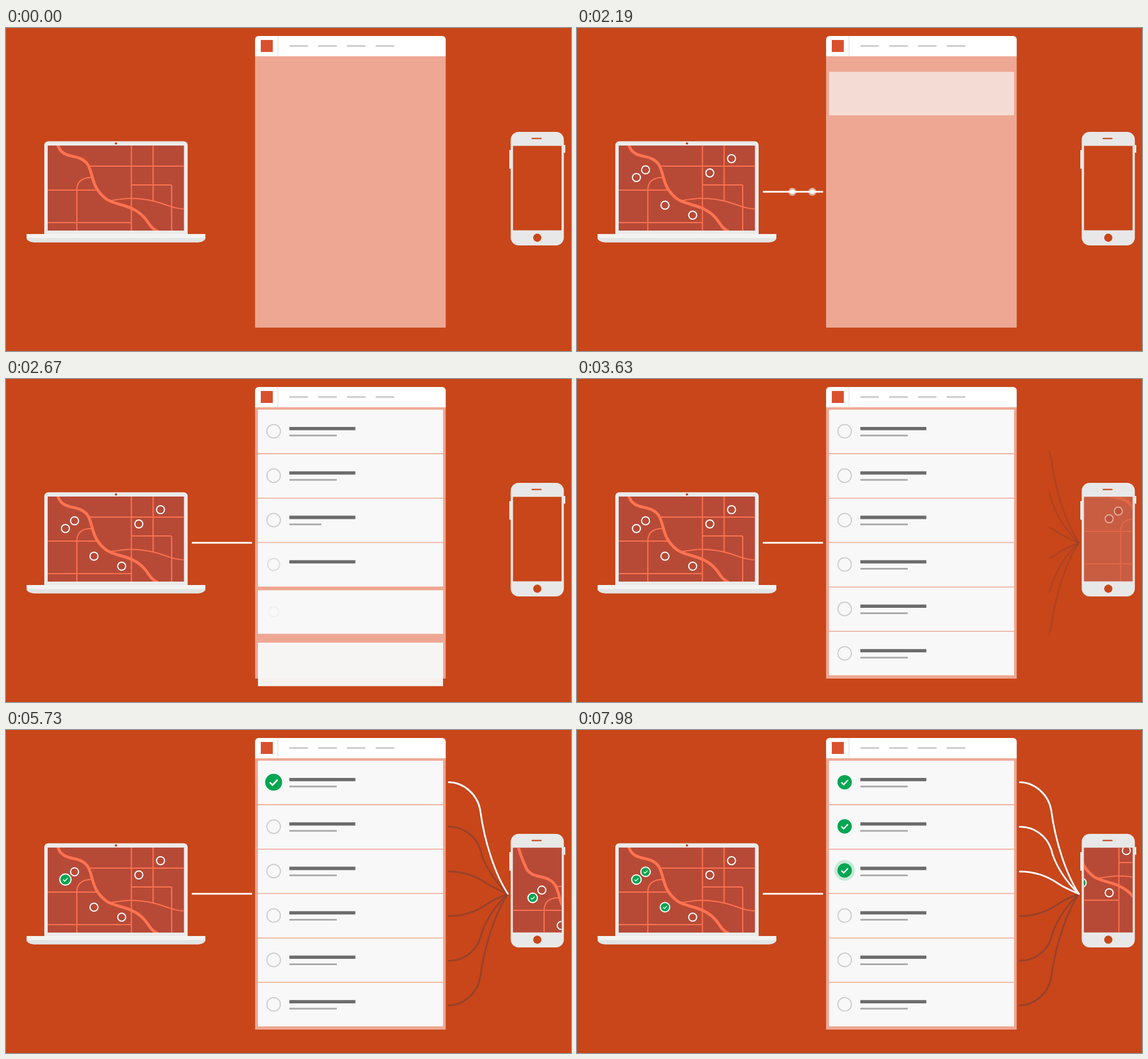
These frames come from a looping animation (989 by 566 pixels, 8 s). An HTML page with a canvas:

```html
<!DOCTYPE html>
<html lang="en">
<head>
<meta charset="utf-8">
<title>Field task flow</title>
<style>
  html, body { margin: 0; width: 100%; height: 100%; overflow: hidden; background: #c8461a; }
  canvas { display: block; }
</style>
</head>
<body>
<canvas id="stage" width="989" height="566"></canvas>
<script>
const ctx = document.getElementById('stage').getContext('2d');
const LOOP = 8000;
const BG = '#c8461a', MAP = '#b74a37', ROAD = '#ff7350', GREEN = '#00a651', WHITE = '#fff';

const markers = [[104, 262], [120, 248.5], [154, 310.5], [202.5, 328], [232.5, 254], [270.5, 229]];
const taskStarts = [5130, 6210, 7260];
const panStarts = [4530, 5595, 6680, 7730];
const panStops = [[827.5, -17], [826, 25], [810, 39], [776, -23], [728.5, -43]];

const river = new Path2D('M78 170C82 186 86 195 91 206C100 232 128 218 143 239C154 257 148 279 176 300C192 311 222 309 242 332C250 341 254 352 265 356');
const roads = new Path2D('M146 242H340M40 284H159M40 341H219.5M219.5 150V420M257.5 150V303' +
  'M219.5 275H288Q290 275 290 277V400M124 420V284Q124 262 150 262M180 303C205 299 222 295 257 303C280 308 292 317 313 317');

// Links for the upper three rows; the lower three mirror them about y = 287.
const upperLinks = [
  'M775 91.5C800 91.5 825 112 830 140C838 200 858 256 878.5 287',
  'M775 169.5C800 169.5 822 185 830 209C836 235 855 265 878.5 287',
  'M775 248C800 248 822 255 842 269C852 276 864 281 878.5 287'
].map(d => new Path2D(d));
const links = [...upperLinks, ...upperLinks.slice().reverse().map(path => {
  const mirrored = new Path2D();
  mirrored.addPath(path, new DOMMatrix([1, 0, 0, -1, 0, 574]));
  return mirrored;
})];

const progress = (t, start, duration) => Math.min(1, Math.max(0, (t - start) / duration));
const ease = p => (1 - Math.cos(Math.PI * p)) / 2;
const mix = (a, b, p) => a + (b - a) * p;
const pop = t => t < 120 ? 1.18 * progress(t, 0, 120) : mix(1.18, 1, progress(t, 120, 100));

function rect(x, y, w, h, color, radius = 0) {
  ctx.fillStyle = color;
  ctx.beginPath();
  ctx.roundRect(x, y, w, h, radius);
  ctx.fill();
}

function circle(x, y, r, fill, stroke, width = 2) {
  ctx.beginPath();
  ctx.arc(x, y, r, 0, Math.PI * 2);
  if (fill) { ctx.fillStyle = fill; ctx.fill(); }
  if (stroke) { ctx.strokeStyle = stroke; ctx.lineWidth = width; ctx.stroke(); }
}

function line(path, color, width) {
  ctx.strokeStyle = color;
  ctx.lineWidth = width;
  ctx.stroke(path);
}

function withAlpha(alpha, draw) {
  ctx.save();
  ctx.globalAlpha *= alpha;
  draw();
  ctx.restore();
}

function clipped(x, y, w, h, draw) {
  ctx.save();
  ctx.beginPath();
  ctx.rect(x, y, w, h);
  ctx.clip();
  draw();
  ctx.restore();
}

function tick(x, y, scale) {
  ctx.save();
  ctx.translate(x, y);
  ctx.scale(scale, scale);
  ctx.lineCap = 'butt';
  line(new Path2D('M-5.7 .2L-1.7 4.2L5.8 -3.6'), WHITE, 2.4);
  ctx.restore();
}

function drawRoads() {
  line(roads, ROAD, 2);
  line(river, ROAD, 5);
}

function drawDoneMarker([x, y], scale) {
  if (scale <= 0) return;
  circle(x, y, 8.3 * scale, GREEN, WHITE, 2);
  tick(x, y, 0.58 * scale);
}

function drawLaptop(t) {
  rect(67, 198.5, 251, 164, '#ebebeb', [7, 7, 0, 0]);
  circle(192.5, 202.3, 2, '#b8401f');
  clipped(73, 206, 238.5, 149, () => {
    rect(73, 206, 239, 149, MAP);
    drawRoads();
    markers.forEach(([x, y], i) => {
      const start = 240 + 110 * i;
      const scale = pop(t - start);
      const ripple = progress(t, start + 100, 400);
      if (scale > 0) circle(x, y, 7 * scale, MAP, WHITE);
      if (ripple > 0 && ripple < 1) withAlpha(0.6 * (1 - ripple), () => circle(x, y, mix(7, 15, ease(ripple)), null, WHITE));
    });
    taskStarts.forEach((start, i) => drawDoneMarker(markers[i], pop(t - start - 480)));
  });
  ctx.fillStyle = '#f3f3f2';
  ctx.fill(new Path2D('M36 361H349V368C349 372 342 375.5 336 375.5H50C43 375.5 36 372 36 368Z'));
  ctx.fillStyle = '#e2e5e4';
  ctx.fill(new Path2D('M36 368H349C349 372 342 375.5 336 375.5H50C43 375.5 36 372 36 368Z'));
}

function drawUplink(t) {
  const grown = ease(progress(t, 1200, 580));
  if (grown > 0) line(new Path2D(`M326.5 287H${mix(326.5, 429.5, grown)}`), WHITE, 3);
  for (let i = 0; i < 3; i++) {
    const p = progress(t, 1877 + 90 * i, 273);
    if (p <= 0 || p >= 1) continue;
    const x = mix(325, 431, p), size = Math.min(1, p * 6, (1 - p) * 8);
    withAlpha(0.55, () => circle(x, 287, 7 * size, WHITE));
    circle(x, 287, 4 * size, WHITE);
  }
}

function drawRow(t, i) {
  const age = t - 2125 - 90 * i;
  if (age <= 0) return;
  const restTop = 53.8 + 77.85 * i;
  const top = restTop + 27 * (1 - ease(progress(age, 0, 260)));
  const done = i < 3 ? t - taskStarts[i] - 480 : -1;
  const checkScale = pop(done);

  withAlpha(progress(age, 0, 100), () => rect(441, top, 324, 76.3, '#f8f8f8'));
  const ring = progress(age, 150, 200);
  if (checkScale < 1) withAlpha(ring, () => circle(468.5, top + 37.7, mix(8.2, 11.8, ring), null, '#ccc'));
  rect(496, top + 30.1, 115.5 * progress(age, 190, 80), 5.8, '#6c6c6c');
  rect(496, top + 43.7, 83 * progress(age, 300, 98), 3, '#aaa');

  if (checkScale > 0) {
    const y = 91.5 + 77.3 * i;
    const halo = progress(done, 140, 125);
    if (halo > 0) withAlpha(1 - halo, () => circle(468.5, y, mix(14, 19, halo), GREEN));
    circle(468.5, y, 12.6 * checkScale, GREEN);
    tick(468.5, y, checkScale);
  }
}

function drawPanel(t) {
  rect(436, 49, 333.7, 476, '#eea792');
  rect(436, 14, 333.7, 35.4, WHITE, [6, 6, 0, 0]);
  rect(446, 21, 21, 21, '#d9502e');
  rect(475.5, 14, 1.2, 35.4, '#ddd');
  for (let i = 0; i < 4; i++) rect(496 + 50.4 * i, 30, 32.5, 3, '#ccc');
  for (let i = 0; i < 6; i++) drawRow(t, i);
}

function drawLinks(t) {
  const wipe = (p, draw) => {
    if (p > 0) clipped(mix(882, 770, p), 80, 115, 415, draw);
  };
  const shown = progress(t, 3270, 720);
  wipe(shown, () => withAlpha(shown, () => links.forEach(path => line(path, '#97412b', 3))));
  taskStarts.forEach((start, i) =>
    wipe(ease(progress(t, start + 150, 330)), () => line(links[i], WHITE, 3)));
}

function drawPhone(t) {
  rect(881, 214, 5, 32.5, '#e8e8e8');
  rect(974, 205, 5, 13.5, '#e8e8e8');
  rect(883.5, 182, 93, 199, '#e8e8e8', 14);
  line(new Path2D('M921 193.7H936.5'), BG, 2.2);
  circle(930, 367.5, 7.2, BG);
  rect(887.5, 206.5, 85, 148, BG);

  const shown = progress(t, 3270, 720);
  if (!shown) return;
  let [x, y] = panStops[0];
  panStarts.forEach((start, i) => {
    const p = ease(progress(t, start, 270));
    x += (panStops[i + 1][0] - panStops[i][0]) * p;
    y += (panStops[i + 1][1] - panStops[i][1]) * p;
  });
  clipped(887.5, 206.5, 85, 148, () => {
    withAlpha(0.2 * Math.sin(Math.PI * shown), () => rect(887, 206, 86, 149, WHITE));
    withAlpha(shown, () => {
      withAlpha(shown < 1 ? 0.8 : 1, () => rect(887, 206, 86, 149, MAP));
      ctx.translate(x, y);
      drawRoads();
      markers.forEach(([mx, my]) => circle(mx, my, 7, MAP, WHITE));
      taskStarts.forEach((start, i) => drawDoneMarker(markers[i], pop(t - start)));
    });
  });
}

function render(now) {
  const t = now % LOOP;
  ctx.lineCap = 'round';
  rect(0, 0, 989, 566, BG);
  drawLaptop(t);
  drawUplink(t);
  drawPanel(t);
  drawLinks(t);
  drawPhone(t);
  requestAnimationFrame(render);
}
requestAnimationFrame(render);
</script>
</body>
</html>
```
